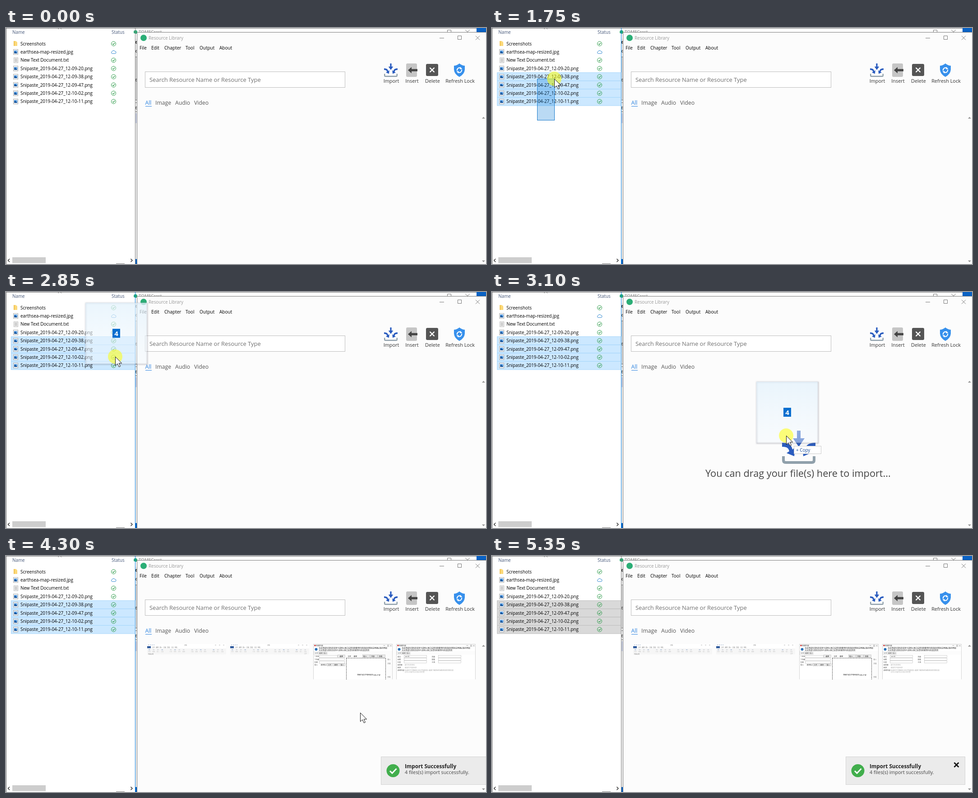
An HTML page that plays this animation: 1064 px wide and 526 px high, repeating every 5.45 s.

```html
<!DOCTYPE html>
<html lang="en">
<head>
<meta charset="utf-8">
<title>Drag files to import</title>
<style>
  html, body { margin: 0; width: 100%; height: 100%; overflow: hidden; background: #fff; }
  svg { display: block; width: 100vw; height: 100vh; }
  text { font-family: 'Open Sans', 'Noto Sans', sans-serif; font-size: 9.9px; white-space: pre; }
  .line { fill: none; stroke: #777; }
  .tiny text { font-family: 'Noto Sans CJK SC', 'Noto Sans CJK', sans-serif; font-size: 3.8px; }
</style>
</head>
<body>
<svg viewBox="0 0 1064 526">
  <defs>
    <g id="import">
      <g fill="#2a5cbf">
        <path d="M33 0H41V17H50L37 36L24 17H33Z"/>
        <path id="side" d="M0 27C15 27 21 32 23 42L29 37L27 57L10 50L16 46C14 38 10 36 0 36Z"/>
        <use href="#side" transform="translate(74) scale(-1 1)"/>
      </g>
      <path d="M3 57V66Q3 71 8 71H66Q71 71 71 66V57" fill="none" stroke="#90a0ab" stroke-width="6"/>
    </g>
    <g id="folder"><path d="M17 -6H22L25 -3V5H17Z" fill="#fbd97a"/><path d="M17 -6H19V5H17Z" fill="#f0c14e"/></g>
    <g id="picture">
      <rect x="16.5" y="-5.5" width="10" height="11" fill="#fff" stroke="#a6a6a6"/>
      <rect x="18" y="-3" width="7" height="6" fill="#2f7fd0"/><path d="M18 3V1L20.5 -1L25 3Z" fill="#174f91"/>
      <circle cx="23" cy="-1" r="1" fill="#cfe8ff"/>
    </g>
    <g id="note">
      <rect x="17.5" y="-5.5" width="9" height="11" fill="#fff" stroke="#b5b5b5"/>
      <path class="line" stroke-width=".7" d="M19 -3H25M19 -1H25M19 1H25M19 3H25"/>
    </g>
    <g id="synced" fill="none" stroke="#2b9a48">
      <circle cx="238.5" r="5"/><path stroke-width="1.2" d="M236 0L238 2L241.3 -1.8"/>
    </g>
    <path id="cloud" d="M235.5 3.5A2.3 2.3 0 0 1 235.3 -1A3.4 3.4 0 0 1 241.4 -1.5A2.5 2.5 0 0 1 241.5 3.5Z" fill="#fff" stroke="#2d86d0"/>
    <linearGradient id="veil" x2="0" y2="1">
      <stop stop-color="#e3f2fc" stop-opacity=".75"/><stop offset="1" stop-color="#f3f9fe" stop-opacity=".45"/>
    </linearGradient>
    <filter id="soft" x="-10%" y="-10%" width="120%" height="120%"><feGaussianBlur stdDeviation="1.6"/></filter>
    <clipPath id="behind"><path d="M279 0H1064V10H291V526H287V12H279Z"/></clipPath>
  </defs>

  <!-- desktop and the window behind -->
  <rect width="1064" height="526" fill="#0a62c4"/>
  <rect x="286" width="757" height="515" fill="#f1f1f1"/>
  <rect x="286" width="757" height="24" fill="#fff"/>
  <path d="M287 64H291V160H287Z" fill="#d8d8d8"/>
  <path d="M287 190H291V212H287Z" fill="#cdd3e6"/>
  <path class="line" d="M286 .5H1043"/>
  <g clip-path="url(#behind)" fill="#333">
    <text x="294" y="13" fill="#888">TOMECrest</text>
    <text x="286" y="35" font-weight="bold">e</text><text x="284" y="55">le</text>
    <text x="286" y="119">e</text><text x="286" y="181">e</text>
    <path class="line" d="M287 64.5H291M287 160.5H291M287 166.5H291M287 186.5H291"/>
  </g>
  <path class="line" d="M939 9.5H947M978.5 10V4.5H986.5V10M1018 4L1023 9L1028 4"/>

  <!-- file list -->
  <rect width="286" height="526" fill="#fff"/>
  <path class="line" d="M.5 0V526M0 .5H286"/>
  <circle cx="287" cy="9" r="4" fill="#2bae76" clip-path="url(#behind)"/>
  <path id="edge" class="line" d="M286.5 0V526"/>
  <path class="line" d="M115 3L119 -1L123 3"/>
  <text x="14" y="13" fill="#46587a">Name</text><text x="234" y="13" fill="#46587a">Status</text>
  <g id="picked"></g>
  <g id="files"></g>
  <rect x="14" y="511" width="74" height="13" fill="#cdcdcd"/>
  <path class="line" d="M8 514.5L4.5 518L8 521.5M276.5 514.5L280 518L276.5 521.5" style="stroke:#333" stroke-width="1.5"/>
  <path class="line" d="M244 525.5H263"/>

  <!-- library window -->
  <rect x="291" y="10" width="773" height="516" fill="#fcfcfc"/>
  <path class="line" d="M1064 9.5H290.5V526"/>
  <circle cx="305" cy="22" r="7" fill="#2bae76"/>
  <text x="316" y="26" fill="#999">Resource Library</text>
  <path class="line" d="M961 22.5H971M1001.5 17.5H1009.5V25.5H1001.5ZM1041 17.5L1050 26.5M1050 17.5L1041 26.5"/>
  <g id="menu" fill="#000"></g>
  <rect x="308.5" y="97.5" width="443" height="35" fill="#fff" stroke="#bdbdbd"/>
  <text x="318" y="120" fill="#707070" style="font-size:12.95px">Search Resource Name or Resource Type</text>
  <g id="tabs"></g>
  <path class="line" d="M309 174.5H323" style="stroke:#2d83e0"/>
  <use href="#import" transform="translate(838 79) scale(.405)"/>
  <rect x="887" y="79" width="24" height="30" rx="3" fill="#c6c6c6"/>
  <path d="M891 94L899 87V91.5H912V96.5H899V101Z" fill="#444"/>
  <rect x="931" y="80" width="27" height="27" rx="3" fill="#555"/>
  <path d="M939.5 88.500L949.5 98.5M949.5 88.5L939.5 98.5" stroke="#fff" stroke-width="2.4"/>
  <path d="M1005 79Q1011 84 1017 84V93Q1016 103 1005 109Q994 103 993 93V84Q999 84 1005 79Z" fill="#3790ec"/>
  <path d="M1000 95A5.3 5.3 0 0 1 1008 89.5M1010 93A5.3 5.3 0 0 1 1002 98.5" fill="none" stroke="#fff" stroke-width="2"/>
  <path d="M1007 86.5L1011.5 91.5L1006.5 92ZM1003 101.5L998.5 96.5L1003.5 96Z" fill="#fff"/>
  <g id="tools" fill="#333" text-anchor="middle"></g>
  <path d="M1055 202L1058.5 198L1062 202ZM1055 518L1058.5 522L1062 518Z" fill="#999"/>

  <g id="thumbs" class="tiny"></g>
  <g id="drop">
    <use href="#import" x="643" y="309"/>
    <text x="473" y="412" fill="#444" style="font-size:21.7px">You can drag your file(s) here to import...</text>
  </g>
  <g id="toast">
    <rect x=".5" y="447.5" width="264" height="62" fill="#ebebeb" stroke="#d3d3d3"/>
    <circle cx="27" cy="478.5" r="14.5" fill="#41ae4c"/>
    <path d="M20 479L25 484L34.5 474" fill="none" stroke="#fff" stroke-width="3"/>
    <text x="53" y="473" fill="#222" font-weight="bold" style="font-size:11.7px">Import Successfully</text>
    <text x="53" y="486" fill="#444" style="font-size:10.8px">4 files(s) import successfully.</text>
    <path id="close" d="M240.5 460.5L250.5 470.5M250.5 460.5L240.5 470.5" stroke="#111" stroke-width="2.8"/>
  </g>

  <rect id="band" fill="#0078d7" fill-opacity=".27" stroke="#1979ca"/>
  <g id="pointer">
    <g id="load">
      <rect x="-65" y="-119" width="136" height="136" fill="none" stroke="#667" stroke-opacity=".45" stroke-width="2" filter="url(#soft)"/>
      <rect x="-66" y="-120" width="136" height="136" fill="url(#veil)"/>
      <rect x="-6" y="-62" width="17" height="20" fill="#0a6fcf"/>
      <text x="2.5" y="-46.5" fill="#fff" font-weight="bold" text-anchor="middle" style="font-size:15px">4</text>
    </g>
    <g id="hint">
      <rect x="17.5" y="23.5" width="60" height="17" fill="#fff" stroke="#ccc"/>
      <text x="22" y="35.5" fill="#1b4f9c">+ Copy</text>
    </g>
    <circle id="glow" r="16" fill="#ff0" fill-opacity=".52"/>
    <path d="M.5 .5V20L5 15.8L8.5 23L11.5 21.6L8.2 14.8H14.5Z" fill="#fff" stroke="#111"/>
  </g>
</svg>
<script>
const $ = id => document.getElementById(id);
const LOOP = 5450, STEP = 50, ROW = 18.4;
const label = (s, x, y, fill, size, more = '') =>
  `<text x="${x}" y="${y}" ${fill ? `fill="${fill}"` : ''} ${size ? `style="font-size:${size}px"` : ''} ${more}>${s}</text>`;
const box = (x, y, w, h, fill = '#fff', stroke = 'none') =>
  `<rect x="${x}" y="${y}" width="${w}" height="${h}" fill="${fill}" stroke="${stroke}" stroke-width=".5"/>`;

// File rows
const shots = ['09-20', '09-38', '09-47', '10-02', '10-11'].map(s => `Snipaste_2019-04-27_12-${s}.png`);
const files = ['Screenshots', 'earthsea-map-resized.jpg', 'New Text Document.txt', ...shots];
$('files').innerHTML = files.map((name, i) => {
  const icon = i === 0 ? 'folder' : i === 2 ? 'note' : 'picture';
  return `<g transform="translate(0 ${35 + i * ROW})"><use href="#${icon}"/>${label(name, 32, 3.5, '#000')}` +
    `<use href="#${i === 1 ? 'cloud' : 'synced'}"/></g>`;
}).join('');
$('picked').innerHTML = files.map((_, i) =>
  `<rect x="11.5" y="${25.8 + i * ROW}" width="274.5" height="${ROW}"/>`).join('');
const rows = [...$('picked').children];

// Window labels
const spread = (id, names, xs, y, size) =>
  $(id).innerHTML = names.split('|').map((s, i) => label(s, xs[i], y, '', size)).join('');
spread('menu', 'File|Edit|Chapter|Tool|Output|About', [296, 322, 351, 398, 429, 473], 48, 10);
spread('tabs', 'All|Image|Audio|Video', [308.5, 331, 375, 417], 171, 12.2);
spread('tools', 'Import|Insert|Delete|Refresh Lock', [854, 900, 945.5, 1006.5], 122, 10.9);
$('tabs').setAttribute('fill', '#555');
$('tabs').firstChild.setAttribute('fill', '#2d83e0');

// Thumbnails
const words = ['文件', '编辑', '插入', '页面', '查看', '工具', '帮助'];
function ribbon(x, wide) {
  let s = box(x, 196, 175, 24) + box(x, 206, 175, 13.5, '#f6f6f6') + box(x, 201, 8, 4.5, '#2b579a');
  for (let i = 0; i < 4; i++) s += box(x + 2 + i * 4, 197.5, 2, 1.5, '#a5b5cc');
  words.forEach((w, i) => s += label(w, x + 11 + i * 8.3, 204.6, '#777', 3));
  s += label('文档', x + 82, 200, '#777', 3);
  for (let i = 0; i < 3; i++) s += box(x + 150 + i * 9, 198, 3, .7, '#999');
  for (let i = 0; i < 18; i++) {
    if (i % 5 === 4) continue;
    const px = x + 3 + i * 9.5;
    s += box(px, 208, 3.5, 2, i % 3 ? '#d6d9de' : '#b9c8dc') + label(words[i % 7], px - 1, 214, '#bbb', 2.8);
  }
  return s + (wide ? label(words[0], x + 164, 219, '#bbb', 3) : label('内容示例', x + 2, 219.5, '#777', 3));
}
function dialog(x) {
  const line = '在这里填写资料的名称与说明以便之后查找和整理内容请选择类别后再确认保存';
  let s = box(x, 196.5, 175, 78.5, '#fcfcfc') + box(x + 2, 198, 3, 3, '#c33') +
    label('新建内容', x + 6, 201.2, '#333') + box(x, 203, 175, 9) +
    `<circle cx="${x + 6}" cy="208" r="3" fill="#2c72b8"/>` +
    label(line + '例如', x + 12, 207.3, '#222', 4.1) +
    label(line.slice(0, 28), x + 12, 211.5, '#333', 4);
  s += `<path class="line" stroke-width=".6" d="M${x} 275V196.5H${x + 175}V275" style="stroke:#bbb"/>`;
  s += `<path class="line" stroke-width=".6" d="M${x + 155} 199.5h4m5 -1h3v3h-3zm6 0l3 3m0 -3l-3 3"/>`;
  for (let i = 0; i < 3; i++) s += box(x + 1 + i * 10, 213.5, 9.5, 6, i ? '#eee' : '#fff', '#ccc') +
    label(words[i], x + 2.5 + i * 10, 218, '#555');
  return s;
}
function editor(x) {
  let s = dialog(x) + box(x + .5, 220, 72, 55) + box(x + 73, 227, 87, 48);
  ['* 书名', '* 作者', '分类', '导入'].forEach((w, i) => {
    s += label(w, x + 2, 225.2 + i * 6.4, '#333');
    if (i < 3) s += box(x + 13, 221.5 + i * 6.4, i ? 56 : 40, 4.8, '#fff', '#aaa');
  });
  s += box(x + 54, 220.5, 16, 6, '#eee', '#aaa') + label('选择', x + 58, 225) + label('编辑插入', x + 16, 244.3, '#444');
  for (let i = 0; i < 3; i++) s += box(x + 30 + i * 14, 239.5, 12, 5.5, '#eee', '#aaa') +
    label(words[i], x + 32 + i * 14, 243.8, '#333');
  for (let i = 0; i < 5; i++) s += (i > 1 ? box(x + 75 + i * 17, 220, 16, 6, '#e9e9e9', '#aaa') : '') +
    label(words[i], x + 76 + i * 13 + (i > 1 ? i * 4.3 : 0), 224.8, '#222');
  s += `<path d="M${x + 73} 227.5V275M${x + 73} 227.5H${x + 160}V275" fill="none" stroke="#333" stroke-dasharray="2 1.5"/>`;
  s += label('将图片或文字拖到此处 (jpg, png)', x + 97, 266, '#111', 3.5);
  [232, 241, 271].forEach((y, i) => s += label(words[i + 2], x + 164, y, '#777', 3.5));
  return s;
}
function details(x) {
  let s = dialog(x) + box(x + .5, 220, 174, 55);
  ['语言', '日期', '分类', '出版者', '来源', '说明内容'].forEach((w, i) => {
    const y = 225.5 + i * 6;
    s += label(w, x + 2, y, '#444');
    if (i < 3) s += box(x + 17, y - 4, 50, 4.8, '#fff', '#aaa') + label(words[i + 3], x + 78, y, '#444') +
      box(x + 93, y - 4, 50, 4.8, '#fff', '#aaa');
  });
  return s + label('world', x + 19, 225, '#333', 3.5) + label('填写名称资料', x + 18, 243.5, '#aaa') +
    label('请填写内容来源', x + 18, 249.5, '#aaa') +
    label('在此处写下简短的介绍文字使其他人能够了解资料内容和相关的背景信息', x + 18, 255.5, '#999', 3.4) +
    label('也可以先留空之后再补充完整', x + 18, 260, '#aaa', 3.4);
}
$('thumbs').innerHTML = ribbon(313) + ribbon(497, true) + editor(681.5) + details(865.5);

// Pointer route: time, x, y
const route = [
  [800, 10, 220], [900, 36, 212], [1000, 80, 219], [1050, 97, 230], [1150, 104, 222], [1250, 101, 206],
  [1350, 100, 205], [1750, 138, 113], [2050, 138, 113], [2300, 152, 150], [2700, 152, 150], [2800, 205, 146],
  [2850, 242, 144], [2900, 312, 184], [3000, 456, 270], [3100, 652, 320], [3200, 687, 340], [3500, 687, 340],
  [3750, 785, 349], [4300, 785, 349], [4600, 865, 341], [4700, 935, 294], [4750, 985, 370],
  [4800, 1018, 450], [4850, 1026, 495], [4900, 1026, 495]
];
function locate(t) {
  const i = Math.max(1, route.findIndex(p => p[0] >= t));
  const [a, b] = [route[i - 1], route[i]];
  const k = Math.min(1, Math.max(0, (t - a[0]) / (b[0] - a[0])));
  return [a[1] + (b[1] - a[1]) * k, a[2] + (b[2] - a[2]) * k];
}

const show = (id, on) => $(id).style.display = on ? '' : 'none';
const within = (t, a, b) => t >= a && t < b;

function draw(time) {
  const t = Math.floor((time % LOOP) / STEP) * STEP;
  const visible = within(t, 800, 4900);
  const [x, y] = visible ? locate(t).map(Math.round) : [0, 0];
  show('pointer', visible);
  $('pointer').setAttribute('transform', `translate(${x} ${y})`);
  show('glow', within(t, 1350, 2050) || within(t, 2700, 3250));
  show('load', within(t, 2800, 3250));
  show('hint', within(t, 2900, 3250));

  // Rubber band and the rows it touches
  const banding = within(t, 1400, 2050);
  show('band', banding);
  if (banding) {
    const set = { x: 100.5, y: y + .5, width: x - 100, height: 205 - y };
    for (const key in set) $('band').setAttribute(key, set[key]);
  }
  const top = t < 1400 ? 526 : t < 1750 ? y : 113;
  rows.forEach((row, i) => row.style.display = 25.8 + (i + 1) * ROW > top ? '' : 'none');
  const active = within(t, 1400, 5350);
  $('picked').setAttribute('fill', active ? '#cce8ff' : '#d9d9d9');
  $('picked').setAttribute('stroke', active ? '#a5d5fa' : '#bdbdbd');
  $('edge').style.stroke = active ? '#0078d7' : '#777';

  show('drop', within(t, 2900, 3600));
  show('thumbs', t >= 3600);
  show('toast', t >= 4100);
  const left = Math.pow(1 - Math.min(1, Math.max(0, (t - 4050) / 550)), 3);
  $('toast').setAttribute('transform', `translate(${Math.round(784 + 288 * left)} 0)`);
  show('close', t >= 4800);
}

const start = performance.now();
(function tick() {
  draw(performance.now() - start);
  requestAnimationFrame(tick);
})();
</script>
</body>
</html>
```
